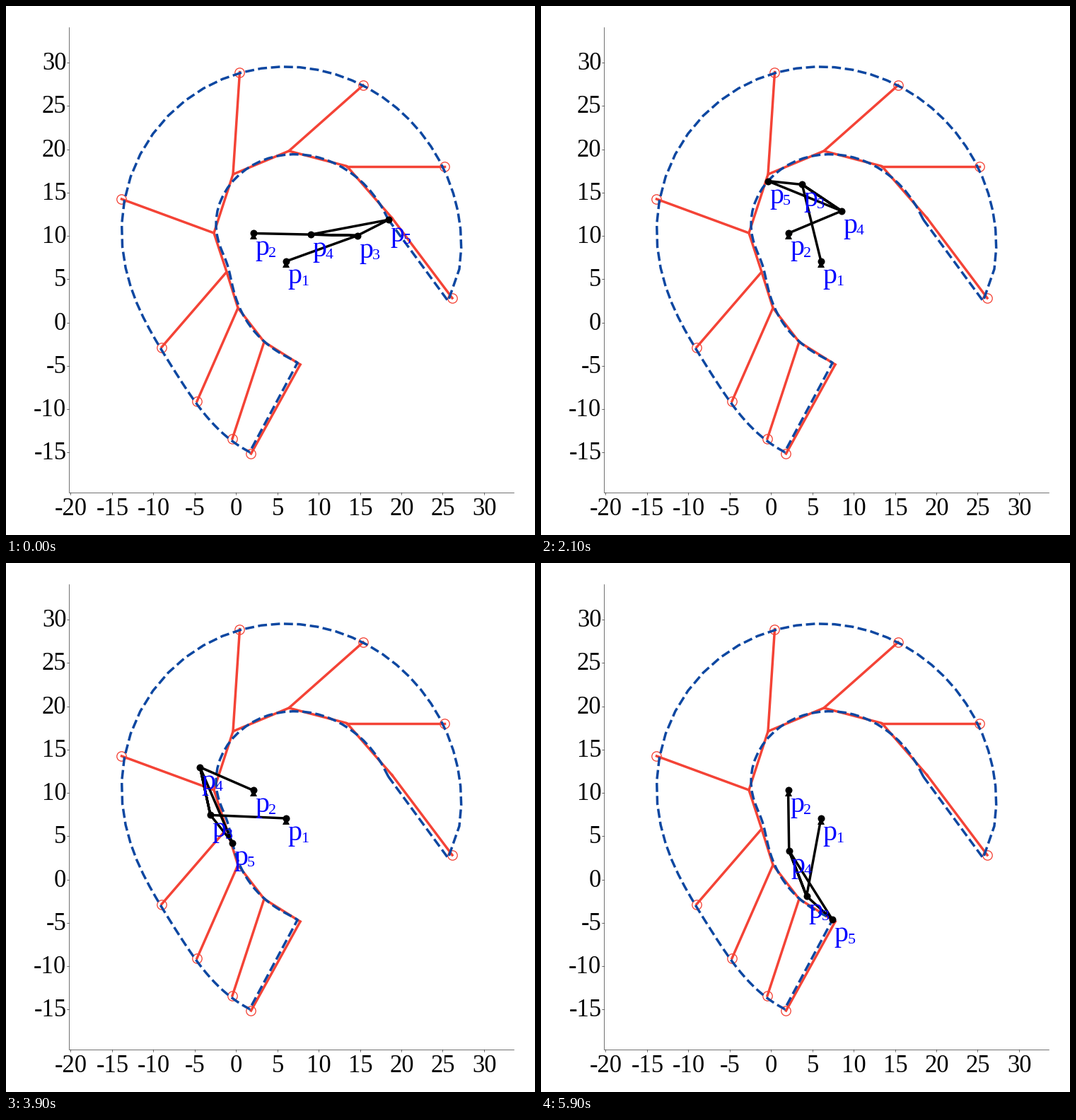
A matplotlib script for the animation above (6000 ms loop, 748x748 px).

```python
import numpy as np
import matplotlib.pyplot as plt
from matplotlib.animation import FuncAnimation

SIZE, DPI, FRAMES = 748, 100, 60
RED, NAVY = "#f44336", "#0d47a1"
PT = 72 / DPI  # points per pixel

# Linkage geometry in data units
P1 = np.array([6.05, 7.06])
P2 = np.array([2.08, 10.29])
CRANK, ROCKER = 9.15, 6.96
START, END = 19, 259
ARM, ARM_TURN = 4.16, -153
TIP, TIP_TURN = 11.84, 128.7


def to_px(p):
    return np.array([325.2 + 11.69 * p[0], 447.5 - 12.25 * p[1]])


def polar(length, deg):
    a = np.radians(deg)
    return length * np.array([np.cos(a), np.sin(a)])


# The motion starts at the dead point, rocker and coupler in line
COUPLER = np.linalg.norm(P1 + polar(CRANK, START) - P2) - ROCKER


def pose(i):
    """Pixel positions of p3, p4, p5 and the tip at step i."""
    p3 = P1 + polar(CRANK, START + (END - START) * i / (FRAMES - 1))
    d = p3 - P2
    dist = np.linalg.norm(d)
    u = d / dist
    along = (ROCKER**2 - COUPLER**2 + dist**2) / (2 * dist)
    off = np.sqrt(max(ROCKER**2 - along**2, 0))
    p4 = P2 + along * u + off * np.array([u[1], -u[0]])
    turn = np.degrees(np.arctan2(*(p4 - p3)[::-1]))
    p5 = p3 + polar(ARM, turn + ARM_TURN)
    tip = p5 + polar(TIP, turn + TIP_TURN)
    return [to_px(p) for p in (p3, p4, p5, tip)]


poses = [pose(i) for i in range(FRAMES)]
base1, base2 = to_px(P1), to_px(P2)

plt.rcParams["font.family"] = "Liberation Serif"
fig = plt.figure(figsize=(SIZE / DPI, SIZE / DPI), dpi=DPI, facecolor="white")
ax = fig.add_axes([0, 0, 1, 1])
ax.set_xlim(0, SIZE)
ax.set_ylim(SIZE, 0)
ax.axis("off")


def line(pts, color, width=2.5, **kw):
    xs, ys = np.array(pts).T
    return ax.plot(xs, ys, color=color, lw=width, **kw)[0]


def text(x, y, s, size, **kw):
    return ax.text(x, y, s, fontsize=size * PT, va="baseline", **kw)


# Axes
LEFT, BOTTOM, THIN = 89.5, 688, 0.4
line([(LEFT, 30), (LEFT, BOTTOM), (718, BOTTOM)], "black", THIN)
for v in range(-20, 31, 5):
    x, y = to_px((v, v))
    line([(x, BOTTOM), (x, BOTTOM + 3)], "black", THIN)
    text(x + 0.5, 720, str(v), 34.7, ha="center")
    if v >= -15:
        line([(LEFT - 3, y), (LEFT, y)], "black", THIN)
        text(85.5, y + 10, str(v), 34.7, ha="right")

# Desired body positions
joints = [(546, 300), (482, 226.5), (400, 205), (321, 238), (294, 321),
          (312, 376), (328, 427), (365, 475), (416, 507)]
tips = [(631, 413), (620, 226.5), (505, 112), (330.5, 93.5), (163.5, 273),
        (220, 482.5), (270, 559), (320, 612), (346.5, 633)]
line(joints, RED)
for joint, tip in zip(joints, tips):
    line([joint, tip], RED)
    line([tip], RED, marker="o", ms=13.4 * PT, mfc="none", mew=1.3 * PT)

# Swept outline: coupler point forward, tip backward
outline = [p[2] for p in poses] + [p[3] for p in poses[::-1]]
line(outline + outline[:1], NAVY, ls="--")

# Moving links
links = line([base1, base2], "black", zorder=4, solid_joinstyle="round")
dots = line([base1, base2], "black", 0, ls="none", marker="o",
            ms=10 * PT, mew=0, zorder=5)
line([base1 + (0, 3.5), base2 + (0, 3.5)], "black", 0, ls="none",
     marker="^", ms=10.5 * PT, mew=0, zorder=5)


def add_label(n):
    return (text(0, 0, "p", 40, color="blue", zorder=6),
            text(0, 0, str(n), 22, color="blue", zorder=6))


def move_label(label, p):
    label[0].set_position(p + (2.5, 31))
    label[1].set_position(p + (21, 33.5))


labels = [add_label(n) for n in range(1, 6)]


def draw(i):
    p3, p4, p5, _ = poses[i]
    links.set_data(*np.array([base1, p3, p5, p4, p3, p4, base2]).T)
    pins = [base1, base2, p3, p4, p5]
    dots.set_data(*np.array(pins).T)
    for label, p in zip(labels, pins):
        move_label(label, p)
    return [links, dots]


anim = FuncAnimation(fig, draw, frames=FRAMES, interval=100, repeat=True,
                     repeat_delay=0)
plt.show()
```
